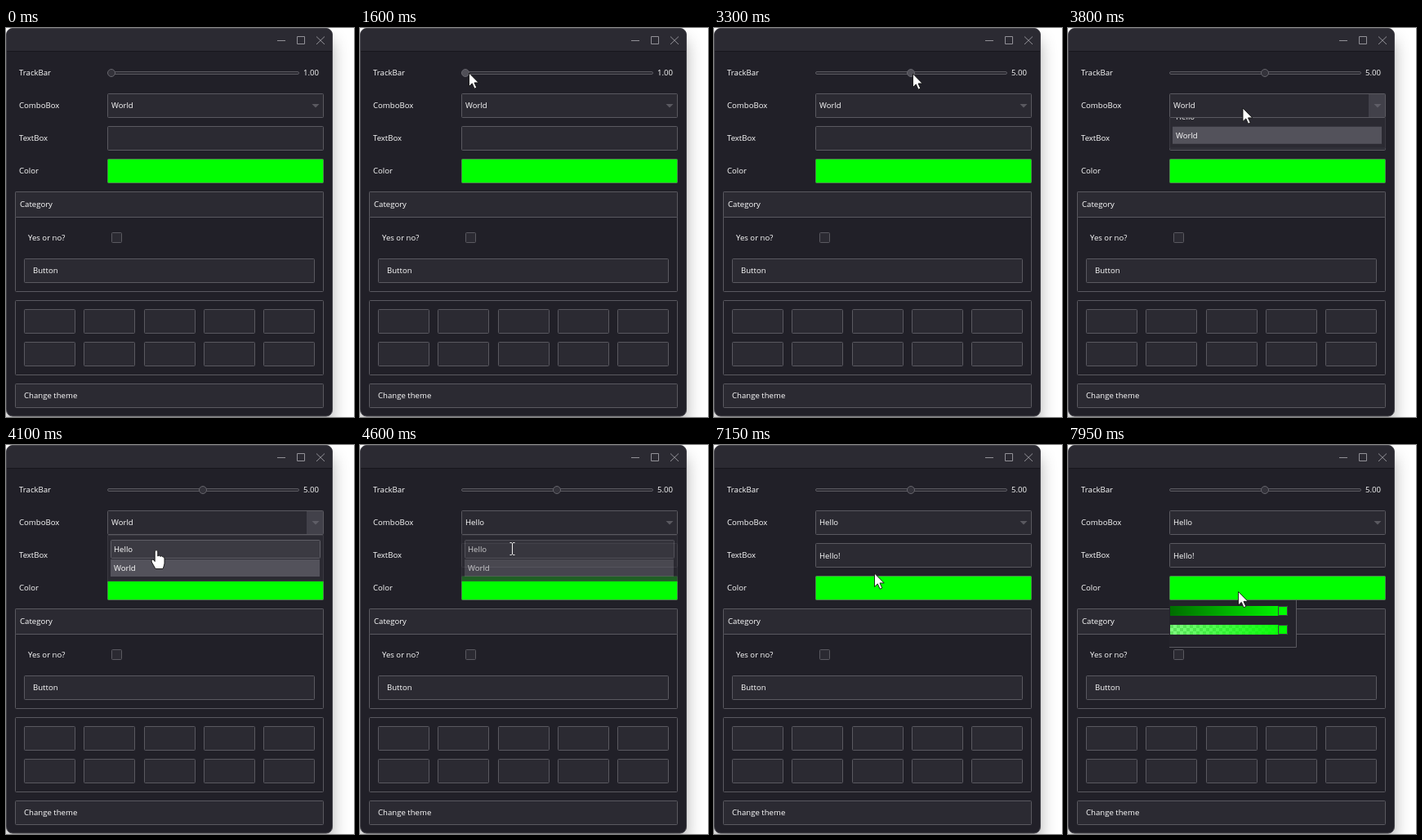
An HTML page for the animation above (8000 ms loop, 426 by 476 pixels).

```html
<!DOCTYPE html>
<html lang="en">
<head>
<meta charset="utf-8">
<title>Dark controls demo</title>
<style>
  html, body { margin: 0; width: 100%; height: 100%; overflow: hidden; background: #fff; }
  .shadow { position: absolute; left: 0; top: 0; width: 400px; height: 475px; border-radius: 8px;
    box-shadow: 0 14px 20px rgba(0, 0, 0, .3); }
  svg { position: absolute; left: 0; top: 0; display: block; }
  text { font: 9.6px "Open Sans", "Noto Sans", sans-serif; fill: #fff; white-space: pre; }
  .box { fill: #2b2a32; stroke: #5a5960; }
  .group { fill: none; stroke: #5a5960; }
  .icon { fill: none; stroke: #929197; }
</style>
</head>
<body>
<div class="shadow"></div>
<svg width="426" height="476" viewBox="0 0 426 476">
  <defs>
    <linearGradient id="shade"><stop stop-color="#006c00"/><stop offset="1" stop-color="#0f0"/></linearGradient>
    <linearGradient id="alpha"><stop stop-color="#0f0" stop-opacity=".5"/><stop offset="1" stop-color="#0f0"/></linearGradient>
    <pattern id="checks" x="125" y="220" width="8" height="8" patternUnits="userSpaceOnUse">
      <path fill="#fff" d="M0 0h8v8h-8z"/><path fill="#c4c4c4" d="M0 0h4v4h-4zM4 4h4v4h-4z"/>
    </pattern>
    <clipPath id="listClip"><path d="M120 110h272v60h-272z"/></clipPath>
    <clipPath id="pickClip"><path d="M124 190h240v100h-240z"/></clipPath>
  </defs>

  <rect x=".5" y=".5" width="399" height="474.5" rx="7.5" fill="#212028" stroke="#45444b"/>
  <path d="M1 28V8a7 7 0 0 1 7-7H392a7 7 0 0 1 7 7V28z" fill="#2b2a32"/>
  <path d="M1 28.5H399" stroke="#17161c"/>
  <path class="icon" d="M332 15.5h10M356.500 10.500h9v9h-9zM380 10.500l10 9.500M390 10.500l-10 9.500"/>

  <g id="form"></g>

  <rect class="box" x="124.500" y="53.500" width="234" height="3" rx="1.500"/>
  <circle id="knob" cx="129" cy="55" r="4.500" stroke="#66656c"/>
  <text id="value" x="364" y="58"></text>

  <path id="dropBtn" d="M368 81h20v28h-20z" fill="#42414a"/>
  <path id="chevron" d="M374.500 93h9l-4.500 4.500z"/>
  <text id="choice" x="129" y="98"></text>
  <text id="typed" x="129" y="139"></text>
  <path id="caret" d="M.5 128v14" stroke="#fff"/>

  <g clip-path="url(#listClip)"><g id="list">
    <path d="M124.500 110.500h264v56h-264z" fill="#2b2a32" stroke="#3a3941"/>
    <rect id="hot" x="128.500" y="116.500" width="256" height="22" rx="1" fill="#3b3a42" stroke="#5f5e66"/>
    <path d="M128 140h256v21h-256z" fill="#53525b"/>
    <text x="132" y="131">Hello</text><text x="132" y="154">World</text>
  </g></g>

  <g clip-path="url(#pickClip)"><g id="picker">
    <path d="M46 160h233.500v87.500h-233.500z" fill="#24232b" stroke="#5a5960"/>
    <path d="M125 197h144v12h-144z" fill="url(#shade)"/>
    <path d="M125 220h144v12h-144z" fill="url(#checks)"/>
    <path d="M125 220h144v12h-144z" fill="url(#alpha)"/>
    <path d="M257.500 197.500h11v11h-11zM257.500 220.500h11v11h-11z" fill="#0f0" stroke="#3d3c44"/>
  </g></g>

  <g id="pointer">
    <path id="arrow" d="M0 0V16.500L3.800 12.900L6.600 19.200L9.300 18L6.500 11.900H11.700Z" fill="#fff" stroke="#111" stroke-width=".9"/>
    <path id="hand" d="M-1.800 2Q0-1 1.800 2V8Q3.500 6.300 5 8.300Q6.700 7 8 9Q10 8.300 10 11V17Q9.500 20 8 23.500H-1L-5.800 15Q-6.500 11.500-4 12L-1.800 14.500Z" fill="#fff" stroke="#111" stroke-width=".9"/>
    <path id="beam" d="M-2.500-7.500H-.8L.5-6.500L1.800-7.500H3.500M.5-6.500V6.500M-2.500 7.500H-.8L.5 6.500L1.800 7.500H3.500" fill="none" stroke="#eee"/>
  </g>
</svg>
<script>
const $ = id => document.getElementById(id);
const LOOP = 8000, STEP = 50;

// Static form
const parts = [];
const box = (x, y, w, h, more = 'class="box"') =>
  parts.push(`<rect x="${x + .5}" y="${y + .5}" width="${w - 1}" height="${h - 1}" rx="1" ${more}/>`);
const label = (x, y, s) => parts.push(`<text x="${x}" y="${y}">${s}</text>`);
['TrackBar', 'ComboBox', 'TextBox', 'Color'].forEach((s, i) => label(16, 58 + 40 * i, s));
box(124, 80, 265, 30);
box(124, 120, 265, 30);
box(124, 160, 265, 30, 'fill="#0f0" stroke="#4a8a4a"');
box(11, 200, 378, 123, 'class="group"');
box(11, 200, 378, 32);
label(17, 219, 'Category');
label(27, 260, 'Yes or no?');
box(129, 250, 13, 13);
box(22, 282, 356, 30);
label(33, 300, 'Button');
box(11, 333, 378, 92, 'class="group"');
for (const y of [344, 384])
  for (let i = 0; i < 5; i++) box(Math.round(22 + 73.25 * i), y, 63, 30);
box(11, 435, 378, 30);
label(22, 453, 'Change theme');
$('form').innerHTML = parts.join('');

// Pointer path: time, x, y
const path = [
  [950, 396, 482], [1250, 285, 300], [1600, 133.5, 55], [1750, 133, 55], [1950, 133, 55],
  [3150, 243.5, 56], [3300, 243.5, 56], [3550, 215, 97], [3800, 214, 98], [4100, 184, 128],
  [4550, 186, 127], [4900, 186, 127], [5150, 163, 142], [5300, 161, 141], [7000, 161, 141],
  [7150, 196.5, 157], [7850, 208.5, 179.5], [8000, 208.5, 179.5]
];
const keys = [5750, 5900, 6050, 6200, 6450, 6600];

const clamp = v => Math.min(1, Math.max(0, v));
const within = (t, a, b) => t >= a && t < b;
const show = (id, on) => $(id).setAttribute('visibility', on ? 'visible' : 'hidden');
const put = (id, name, v) => $(id).setAttribute(name, v);

function pointAt(t) {
  const i = Math.max(1, path.findIndex(k => k[0] > t));
  const [t0, x0, y0] = path[i - 1], [t1, x1, y1] = path[i];
  let p = clamp((t - t0) / (t1 - t0));
  if (i === 1) p *= p;
  else if (i === 2) p = 1 - (1 - p) ** 2;
  else p = p * p * (3 - 2 * p);
  return [x0 + (x1 - x0) * p, y0 + (y1 - y0) * p];
}

function draw(t) {
  const [x, y] = pointAt(t);
  const seen = within(t, 1000, 5750) || t >= 7050;
  const open = within(t, 3750, 4600);
  const onItem = open && y > 116;
  const inText = !open && x > 124 && x < 389 && y > 120 && y < 150;
  const kind = onItem ? 'hand' : inText ? 'beam' : 'arrow';
  put('pointer', 'transform', `translate(${x} ${y})`);
  for (const k of ['arrow', 'hand', 'beam']) show(k, seen && k === kind);

  // Slider follows the pointer in tenths
  const drag = t < 1950 ? 0 : t < 3150 ? x - 133 : 110.5;
  const value = 1 + Math.round(drag / 110.5 * 40) / 10;
  $('value').textContent = value.toFixed(2);
  put('knob', 'cx', 129 + (value - 1) * 28);
  put('knob', 'fill', within(t, 1550, 3400) ? '#504f57' : '#33323a');

  // Combo list slides in, fades out
  show('dropBtn', open);
  put('chevron', 'fill', open ? '#5f5e67' : '#5a5960');
  $('choice').textContent = t < 4600 ? 'World' : 'Hello';
  show('list', within(t, 3750, 4800));
  show('hot', onItem || within(t, 4600, 4800));
  put('list', 'transform', `translate(0 ${58 * (clamp((t - 3700) / 150) - 1)})`);
  put('list', 'opacity', 1 - clamp((t - 4550) / 200));

  // Typing
  $('typed').textContent = 'Hello!'.slice(0, keys.filter(k => t >= k).length);
  const wide = $('typed').textContent ? $('typed').getComputedTextLength() : 0;
  put('caret', 'transform', `translate(${129 + Math.round(wide)} 0)`);
  show('caret', within(t, 5500, 6850));

  // Colour popup scrolls in diagonally
  const p = clamp((t - 7900) / 50) - 1;
  show('picker', t >= 7900);
  put('picker', 'transform', `translate(${78 * p} ${29 * p})`);
}

const start = performance.now();
function tick() {
  const t = (performance.now() - start) % LOOP;
  draw(Math.floor(t / STEP) * STEP);
  requestAnimationFrame(tick);
}
tick();
</script>
</body>
</html>
```
